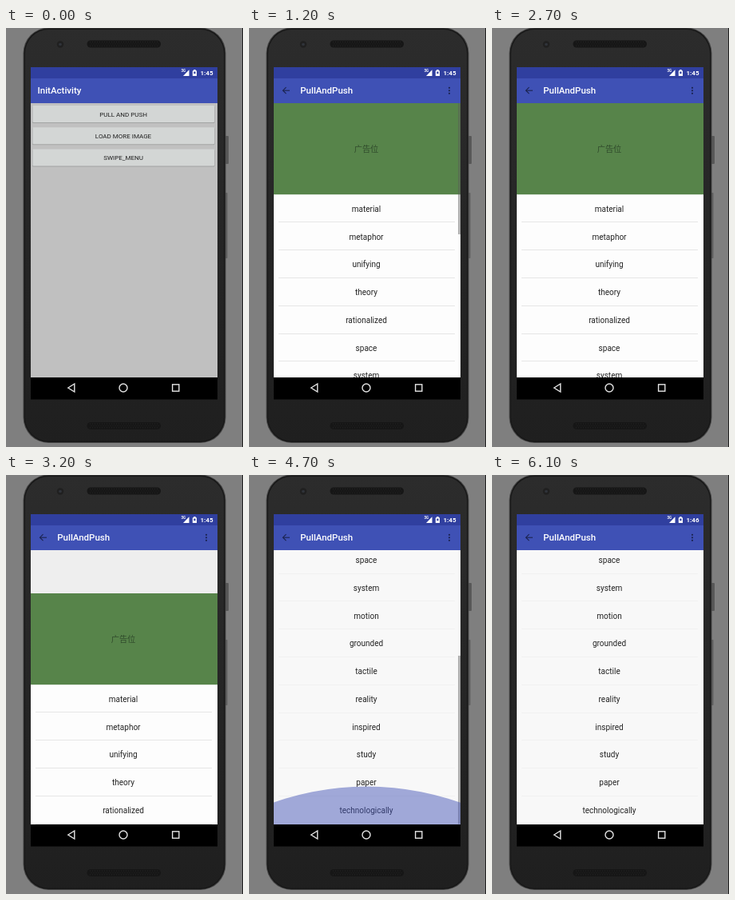
An HTML page with a canvas for the animation above (6500 ms loop, 297 px wide and 524 px high).

```html
<!DOCTYPE html>
<html lang="en">
<head>
<meta charset="utf-8">
<style>
  html, body { margin: 0; width: 100%; height: 100%; overflow: hidden; background: #7f7f7f; }
  canvas { display: block; width: 297px; height: 524px; }
</style>
</head>
<body>
<canvas id="stage"></canvas>
<script>
const LOOP = 6500, STEP = 100;
const SCREEN = { x: 31, y: 49, w: 234, h: 415 };
const BAR = 63, TOP = 94, BOTTOM = 437, HEADER = 114.2, ROW = 34.78, MAX_SCROLL = 293.7;
const WORDS = ('material metaphor unifying theory rationalized space system motion ' +
  'grounded tactile reality inspired study paper technologically').split(' ');
const MENU = ['Normal', 'OverScroll effect', 'LoadData Scrollable',
  'Replace contentview', 'Add error view', 'Change refresh'];
const BUTTONS = ['PULL AND PUSH', 'LOAD MORE IMAGE', 'SWIPE_MENU'];

const canvas = document.getElementById('stage');
const ratio = window.devicePixelRatio || 1;
canvas.width = 297 * ratio;
canvas.height = 524 * ratio;
const ctx = canvas.getContext('2d');
ctx.scale(ratio, ratio);

const bodyColor = ctx.createLinearGradient(0, 0, 0, 520);
bodyColor.addColorStop(0, '#2c2c2c');
bodyColor.addColorStop(1, '#1f1f1f');

// Linear interpolation through [time, value] points.
function track(t, ...points) {
  if (t <= points[0][0]) return points[0][1];
  for (let i = 1; i < points.length; i++) {
    const [t0, v0] = points[i - 1], [t1, v1] = points[i];
    if (t <= t1) return v0 + (v1 - v0) * (t - t0) / (t1 - t0);
  }
  return points[points.length - 1][1];
}

function rect(x, y, w, h, color) {
  ctx.fillStyle = color;
  ctx.fillRect(x, y, w, h);
}

function round(x, y, w, h, r, color) {
  ctx.fillStyle = color;
  ctx.beginPath();
  ctx.roundRect(x, y, w, h, r);
  ctx.fill();
}

function dot(x, y, r, color) {
  ctx.fillStyle = color;
  ctx.beginPath();
  ctx.arc(x, y, r, 0, 7);
  ctx.fill();
}

function poly(points, color, line, close) {
  ctx.beginPath();
  points.forEach(([x, y]) => ctx.lineTo(x, y));
  if (close) ctx.closePath();
  if (line) {
    ctx.strokeStyle = color;
    ctx.lineWidth = line;
    ctx.stroke();
  } else {
    ctx.fillStyle = color;
    ctx.fill();
  }
}

function text(str, x, y, size, color, align = 'center', weight = 400) {
  ctx.font = `${weight} ${size}px Roboto, "Noto Sans CJK SC", "Noto Sans CJK", sans-serif`;
  ctx.textAlign = align;
  ctx.textBaseline = 'alphabetic';
  ctx.fillStyle = color;
  ctx.fillText(str, x, y + size * 0.355);
}

// Runs draw with its own clip rectangle, opacity and other state.
function layer(x, y, w, h, alpha, draw) {
  ctx.save();
  ctx.beginPath();
  ctx.rect(x, y, w, h);
  ctx.clip();
  ctx.globalAlpha = alpha;
  draw();
  ctx.restore();
}

function speaker(y) {
  round(101.5, y, 92.5, 9, 4.5, '#161616');
  for (let row = 0; row < 3; row++)
    for (let x = 105; x < 192; x += 3) rect(x + row % 2 * 1.5, y + 1.5 + row * 2.4, 1, 1, '#252525');
}

function drawPhone() {
  rect(0, 0, 297, 524, '#7f7f7f');
  rect(296, 0, 1, 524, '#1c1c1c');
  round(273, 135, 6, 35, 1, '#585858');
  round(273, 206, 4.5, 82, 1, '#606060');
  round(21.5, -0.5, 254, 519.5, 32, '#454545');
  round(22.5, 0.5, 252, 517.5, 31, '#181818');
  round(24, 2, 249, 514.5, 29.5, bodyColor);
  speaker(15.5);
  speaker(493);
  dot(68, 20.5, 4.2, '#202020');
  dot(68, 20.5, 1.8, '#30343a');
}

function drawSystemBars(t) {
  rect(SCREEN.x, SCREEN.y, SCREEN.w, BAR - SCREEN.y, '#303f9f');
  text('3G', 219.5, 53.5, 4.5, '#fff', 'left', 700);
  poly([[222, 60], [229.5, 60], [229.5, 52.3]], '#fff');
  rect(235.2, 52, 2.4, 2, '#fff');
  round(233.8, 53.2, 5.2, 6.8, 0.6, '#fff');
  rect(235.3, 54.6, 2.2, 2.6, '#303f9f');
  text(t < 5000 ? '1:45' : '1:46', 259.5, 55.8, 8, '#fff', 'right', 700);

  rect(SCREEN.x, BOTTOM, SCREEN.w, 27.5, '#000');
  poly([[77.8, 450], [85.8, 445], [85.8, 455]], '#e4e4e4', 1.4, true);
  ctx.beginPath();
  ctx.arc(147, 450, 5, 0, 7);
  ctx.stroke();
  ctx.strokeRect(208.6, 445.8, 8.2, 8.4);
}

function drawToolbar(title, x) {
  rect(SCREEN.x, BAR, SCREEN.w, TOP - BAR, '#3f51b5');
  text(title, x, 78.1, 11.5, '#fff', 'left', 500);
}

function drawHome(t) {
  rect(SCREEN.x, TOP, SCREEN.w, BOTTOM - TOP, '#c0c0c0');
  drawToolbar('InitActivity', 39.5);
  const press = track(t, [300, 0], [500, 1]);
  BUTTONS.forEach((label, i) => {
    const y = 97 + i * 27.2;
    round(33, y + 0.8, 228.5, 21.3, 1.2, '#a2a4a3');
    round(33.4, y, 227.7, 21, 1.2, '#d3d6d5');
    if (i === 0) round(33.4, y, 227.7, 21, 1.2, `rgba(0,0,0,${0.04 * press})`);
    text(label, 147, y + 10.7, 8, '#1f1f1f');
  });
}

function drawGlow(t) {
  const height = track(t, [4600, 0], [4700, 1], [4800, 0.93], [4900, 0.72], [5000, 0.45], [5100, 0.18], [5200, 0]);
  if (!height) return;
  ctx.save();
  ctx.translate(147.5, BOTTOM);
  ctx.scale(1, height);
  ctx.globalAlpha *= Math.min(1, height * 1.3);
  dot(0, 301.5, 349, 'rgba(63,81,181,0.48)');
  ctx.restore();
}

function drawScrollbar(t, scroll) {
  const alpha = t < 3000
    ? track(t, [2300, 1], [2700, 0])
    : track(t, [4200, 0], [4300, 1], [4900, 1], [5200, 0]);
  const part = scroll / MAX_SCROLL;
  rect(262, TOP + 132 * part, 3, 164 + 46.5 * part, `rgba(90,90,90,${0.45 * alpha})`);
}

function drawList(t) {
  const pull = track(t, [2900, 0], [3000, 16], [3100, 38], [3200, 54], [3500, 55.5],
    [3800, 55.5], [3900, 42.5], [4000, 22], [4100, 8], [4200, 0]);
  const scroll = track(t, [4200, 0], [4300, 38], [4400, 125], [4500, 218], [4600, MAX_SCROLL]);
  const top = TOP + pull - scroll;
  const [paper, divider] = scroll ? ['#f8f8f8', '#f1f1f1'] : ['#fdfdfd', '#e6e6e6'];
  rect(SCREEN.x, TOP, SCREEN.w, BOTTOM - TOP, paper);
  if (pull) rect(SCREEN.x, TOP, SCREEN.w, pull, '#eee');
  rect(SCREEN.x, top, SCREEN.w, HEADER, '#57844a');
  text('广告位', 147, top + 57.5, 10.2, '#304b2c');
  WORDS.forEach((word, i) => {
    const y = top + HEADER + i * ROW;
    text(word, 147, y + 18, 10, '#242424');
    if (i < WORDS.length - 1) rect(37, Math.round(y + ROW - 0.5), 221, 1, divider);
  });
  drawScrollbar(t, scroll);
  drawGlow(t);
}

function drawListPage(t) {
  layer(SCREEN.x, TOP, SCREEN.w, BOTTOM - TOP, ctx.globalAlpha, () => drawList(t));
  drawToolbar('PullAndPush', 64.2);
  poly([[51, 78.2], [42.5, 78.2]], '#1b234f', 1.1);
  poly([[46.5, 74.2], [42.5, 78.2], [46.5, 82.2]], '#1b234f', 1.1);
  for (let i = -1; i < 2; i++) dot(251, 78.3 + i * 3.5, 1.1, '#1b234f');
}

function drawMenu(t) {
  const open = track(t, [1700, 0], [1800, 0.4], [1900, 0.85], [2000, 1]);
  const alpha = Math.min(open, track(t, [2200, 1], [2300, 0.6], [2400, 0.2], [2500, 0]));
  if (!alpha) return;
  const w = 108.5 * (0.4 + 0.6 * open), h = 159 * open, x = 261.7 - w;
  layer(SCREEN.x, SCREEN.y, SCREEN.w, SCREEN.h, alpha, () => {
    ctx.shadowColor = 'rgba(0,0,0,0.4)';
    ctx.shadowBlur = 7 * ratio;
    ctx.shadowOffsetY = 2 * ratio;
    round(x, 64, w, h, 1, '#f9f9f9');
  });
  layer(x, 64, w, h, alpha, () =>
    MENU.forEach((item, i) => text(item, 160.7, 76 + i * 27.2, 9.07, '#222', 'left')));
}

function draw(t) {
  drawPhone();
  drawHome(t);
  const shown = track(t, [900, 0], [1000, 0.45], [1100, 0.88], [1200, 1]);
  if (shown) {
    layer(SCREEN.x, BAR, SCREEN.w, BOTTOM - BAR, shown, () => {
      ctx.translate(0, 22 * (1 - shown));
      drawListPage(t);
    });
  }
  drawSystemBars(t);
  drawMenu(t);
}

const start = performance.now();
function frame() {
  const time = (performance.now() - start) % LOOP;
  draw(Math.floor(time / STEP) * STEP);
  requestAnimationFrame(frame);
}
frame();
</script>
</body>
</html>
```
